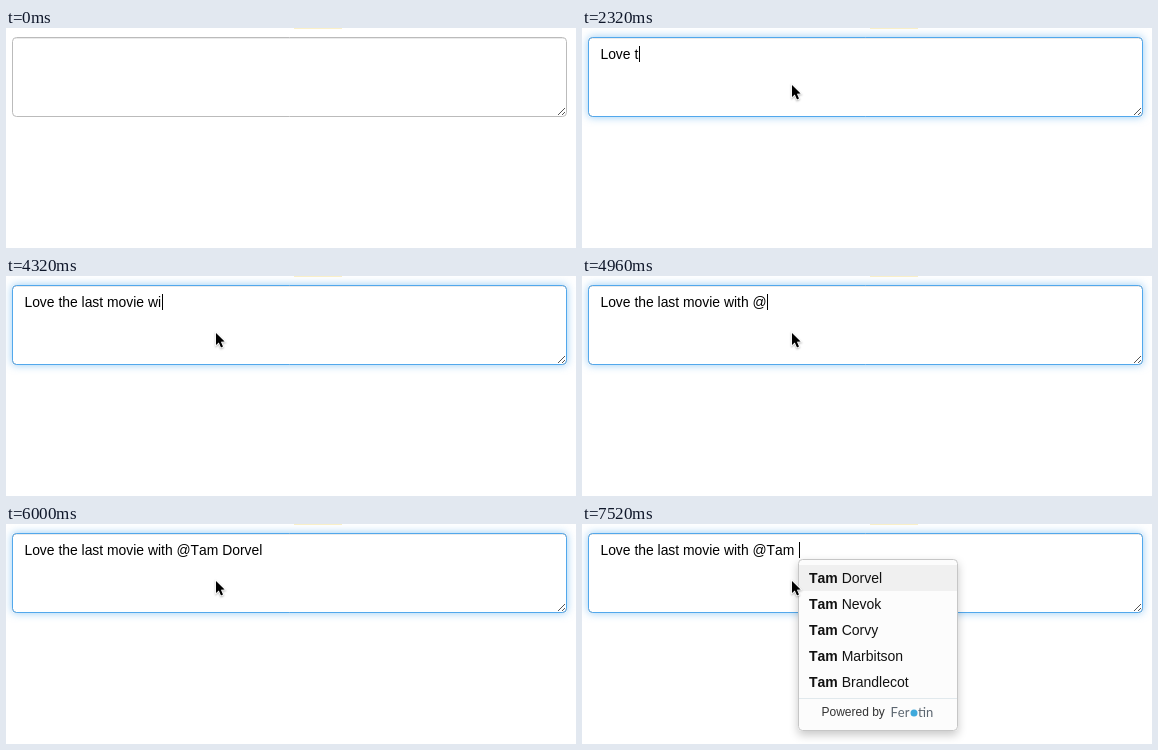
Write an HTML page with a canvas that moves like this. It is 570 by 220 pixels and loops after 8 s.

```html
<!DOCTYPE html>
<html lang="en">
<head>
<meta charset="utf-8">
<title>Mention autocomplete</title>
<style>
html, body { margin: 0; width: 100%; height: 100%; overflow: hidden; background: #fff; }
canvas { display: block; width: 570px; height: 220px; }
</style>
</head>
<body>
<canvas id="stage" width="570" height="220"></canvas>
<script>
const ctx = document.getElementById('stage').getContext('2d');
const LOOP = 8000, STEP = 80;
const SANS = '"Liberation Sans", Arial, sans-serif';
const BLUE = '82, 168, 236';

const SENTENCE = 'Love the last movie with @t';
const PICK = 'Love the last movie with @Tam Dorvel';
const CUT = 'Love the last movie with @Tam ';

// [time, characters typed]
const KEYS = [
  [1680, 1], [1840, 2], [1920, 3], [2080, 4], [2160, 5], [2320, 6], [2480, 8], [2640, 9],
  [2800, 10], [2880, 11], [3040, 12], [3280, 14], [3520, 15], [3600, 16], [3680, 17], [3760, 18],
  [3920, 19], [4000, 20], [4160, 21], [4240, 22], [4400, 23], [4560, 24], [4640, 25], [4960, 26],
  [5040, 27]
];

const FIRST = ['Tam Dorvel', 'Tam Nevok', 'Tam Corvy', 'Tammy Fae Luden', 'Tory Felber'];
const SECOND = ['Tam Dorvel', 'Tam Nevok', 'Tam Corvy', 'Tam Marbitson', 'Tam Brandlecot'];

// Suggestion lists: span, left edge, names, bold letters, time the first row lights up
const MENUS = [
  { from: 5120, to: 5760, x: 188, names: FIRST, bold: 1, lit: 5280 },
  { from: 6960, to: 7200, x: 256, names: ['Tam Dorvel'], bold: 10, lit: 6960 },
  { from: 7360, to: 8000, x: 216, names: SECOND, bold: 3, lit: 7520 }
];

const clamp = v => Math.max(0, Math.min(1, v));

function write(text, x, y, font, color) {
  ctx.font = font;
  ctx.fillStyle = color;
  ctx.fillText(text, x, y);
  return x + ctx.measureText(text).width;
}

function box(x, y, w, h, r) {
  ctx.beginPath();
  ctx.roundRect(x, y, w, h, r);
}

function shadow(color, blur, dy = 0) {
  ctx.shadowColor = color;
  ctx.shadowBlur = blur;
  ctx.shadowOffsetY = dy;
}

function line(x1, y1, x2, y2, color) {
  ctx.strokeStyle = color;
  ctx.lineWidth = 1;
  ctx.beginPath();
  ctx.moveTo(x1, y1);
  ctx.lineTo(x2, y2);
  ctx.stroke();
}

function drawField(focus) {
  ctx.save();
  if (focus > 0) {
    shadow(`rgba(${BLUE}, ${0.6 * focus})`, 8);
    ctx.fillStyle = '#fff';
    box(6, 9, 555, 80, 4);
    ctx.fill();
  }
  ctx.restore();
  ctx.fillStyle = '#fff';
  box(6, 9, 555, 80, 4);
  ctx.fill();
  line(9, 10.5, 558, 10.5, 'rgba(0, 0, 0, 0.08)');
  ctx.lineWidth = 1;
  box(6.5, 9.5, 554, 79, 4);
  ctx.strokeStyle = '#bbb';
  ctx.stroke();
  ctx.strokeStyle = `rgba(${BLUE}, ${focus})`;
  ctx.stroke();
  line(552, 87, 559, 80, '#555');
  line(556, 87, 559, 84, '#555');
}

function textAt(t) {
  if (t >= 7200) return CUT;
  if (t >= 5760) return PICK;
  const key = KEYS.filter(k => k[0] <= t).pop();
  return key ? SENTENCE.slice(0, key[1]) : '';
}

function drawText(t) {
  const end = write(textAt(t), 18.4, 31, '13.9px ' + SANS, '#000');
  const caret = t >= 1200 && !(t >= 6000 && t < 6480);
  if (caret) ctx.fillRect(Math.round(end + 0.5), 18, 1, 16);
}

function drawFooter(x, y) {
  line(x + 1, y + 0.5, x + 159, y + 0.5, '#e1e9ed');
  write('Powered by', x + 23.5, y + 18, '12px ' + SANS, '#333');
  const font = '13px Lato, sans-serif';
  write('Fer', x + 92.5, y + 19, font, '#5c6670');
  write('tin', x + 120, y + 19, font, '#5c6670');
  ctx.fillStyle = '#3fa9dc';
  ctx.beginPath();
  ctx.arc(x + 116, y + 15, 3.5, 0, 7);
  ctx.fill();
}

function drawMenu(menu, t) {
  const { x, names, bold } = menu;
  const y = 35, h = 37 + 26 * names.length;
  ctx.save();
  shadow('rgba(0, 0, 0, 0.22)', 10, 4);
  ctx.fillStyle = '#fcfcfc';
  box(x, y, 160, h + 5, 4);
  ctx.fill();
  ctx.restore();
  ctx.strokeStyle = '#c6c6c6';
  ctx.lineWidth = 1;
  box(x + 0.5, y + 0.5, 159, h + 4 - 4 + 4, 4);
  ctx.stroke();
  if (t >= menu.lit) {
    ctx.fillStyle = '#f0f0f0';
    ctx.fillRect(x + 1, 41, 158, 26);
  }
  names.forEach((name, i) => {
    const base = 59 + 26 * i;
    const next = write(name.slice(0, bold), x + 11, base, 'bold 14px ' + SANS, '#111');
    write(name.slice(bold), next, base, '14px ' + SANS, '#111');
  });
  drawFooter(x, 44 + 26 * names.length);
}

function drawPointer(t) {
  if (t < 320) return;
  const k = clamp((t - 320) / 160), ease = k * (2 - k);
  ctx.save();
  ctx.translate(228 - 18 * ease, 38 + 19 * ease);
  ctx.beginPath();
  [[0, 0], [0, 12], [2.8, 9.4], [5, 14.4], [7, 13.5], [4.9, 8.7], [8.6, 8.6]]
    .forEach(p => ctx.lineTo(...p));
  ctx.closePath();
  ctx.save();
  shadow('rgba(0, 0, 0, 0.3)', 2, 1);
  ctx.strokeStyle = '#fff';
  ctx.lineWidth = 1.6;
  ctx.stroke();
  ctx.restore();
  ctx.fillStyle = '#000';
  ctx.fill();
  ctx.restore();
}

function draw(t) {
  ctx.fillStyle = '#fff';
  ctx.fillRect(0, 0, 570, 220);
  ctx.fillStyle = '#fbf0c8';
  ctx.fillRect(288, 0, 48, 1);
  drawField(clamp((t - 1120) / 200));
  drawText(t);
  MENUS.filter(m => t >= m.from && t < m.to).forEach(m => drawMenu(m, t));
  drawPointer(t);
}

ctx.fontKerning = 'none';
const start = performance.now();
function tick() {
  const t = (performance.now() - start) % LOOP;
  draw(Math.floor(t / STEP) * STEP);
  requestAnimationFrame(tick);
}
tick();
</script>
</body>
</html>
```
